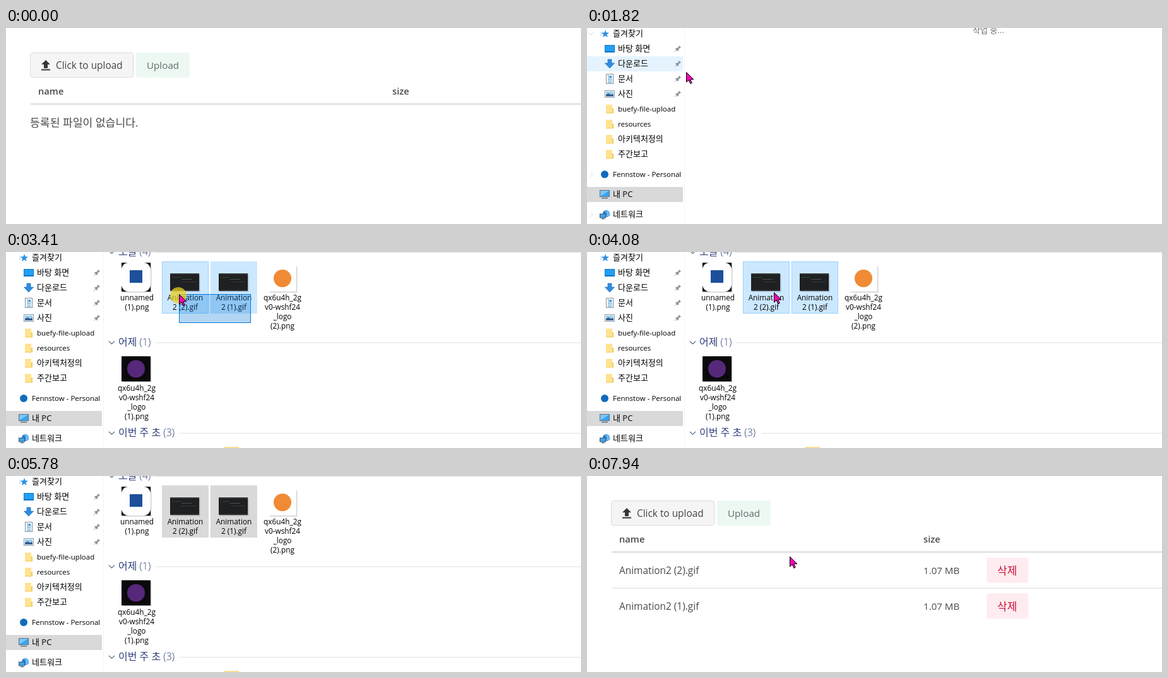
Animation, 911 px wide and 312 px high, one loop 8 s. Source, as an HTML page:

```html
<!DOCTYPE html>
<html lang="ko">
<head>
<meta charset="utf-8">
<title>File upload</title>
<style>
html, body { margin: 0; width: 100%; height: 100%; overflow: hidden; background: #fff; }
svg { display: block; width: 911px; height: 312px; }
text { font-family: "Open Sans", "Noto Sans CJK KR", "Noto Sans CJK", sans-serif; white-space: pre; }
</style>
</head>
<body>
<svg id="stage" viewBox="0 0 911 312" xmlns="http://www.w3.org/2000/svg"></svg>
<script>
const LOOP = 8000, FRAME = 69, HOVER_LAG = 130;
const stage = document.getElementById('stage');

// ---- markup helpers ----
const rect = (x, y, w, h, fill, more = '') =>
  `<rect x="${x}" y="${y}" width="${w}" height="${h}" fill="${fill}" ${more}/>`;
const circle = (x, y, r, fill, more = '') =>
  `<circle cx="${x}" cy="${y}" r="${r}" fill="${fill}" ${more}/>`;
const text = (x, y, size, fill, str, more = '') =>
  `<text x="${x}" y="${y}" font-size="${size}" fill="${fill}" ${more}>${str}</text>`;
const path = (d, fill, more = '') => `<path d="${d}" fill="${fill}" ${more}/>`;
const line = (d, color, w = 1) => path(d, 'none', `stroke="${color}" stroke-width="${w}"`);
const group = (id, body, more = '') => `<g id="${id}" ${more}>${body}</g>`;
const at = (x, y, body) => `<g transform="translate(${x} ${y})">${body}</g>`;

// ---- upload page ----
const INK = '#4a4a4a';
const bold = 'font-weight="600"';

const fileRow = (y, name) =>
  text(51, y + 26, 15.4, INK, name) +
  text(533, y + 26, 15.1, INK, '1.07 MB') +
  rect(633, y, 66, 40, '#feecf0', 'rx="4"') +
  text(650, y + 26.5, 17, '#cc0f35', '삭제');

const page =
  rect(0, 0, 911, 312, '#fff') +
  rect(38.5, 39.5, 163, 39, '#f5f5f5', 'rx="3.5" stroke="#dbdbdb"') +
  at(51, 48, path('M9 16v-6H5l7-7 7 7h-4v6zM5 19.5v-2h14v2z', '#363636')) +
  text(79, 65, 15.4, '#444', 'Click to upload') +
  rect(206, 39, 85, 40, '#edf8f3', 'rx="4"') +
  text(223, 65, 15.2, '#5f6a66', 'Upload') +
  text(51, 106, 14.7, INK, 'name', bold) +
  text(612, 106, 14.7, INK, 'size', bold + ' id="size"') +
  rect(39, 120, 872, 2, '#dbdbdb') +
  group('empty', text(38, 157, 17.2, INK, '등록된 파일이 없습니다.')) +
  group('list', fileRow(130, 'Animation2 (2).gif') + rect(39, 178, 872, 1, '#dbdbdb') +
    fileRow(187, 'Animation2 (1).gif'));

// ---- navigation pane; icons are drawn around their centre ----
const icons = {
  star: path('M1-6 2.5-1.8 7-1.5 3.5 1.2 4.8 5.8 1 3.2-3 5.8-1.8 1.2-5-1.5-.5-1.8z', '#2f8fe0') +
    line('M-7-1H-4M-7 2H-4', '#8cc4f2'),
  desk: rect(-8, -6, 16, 12, '#1274c4') + rect(-7, -5, 14, 9, '#23a0f5'),
  down: path('M-3-7H3V-1H7.5L0 7-7.5-1H-3z', '#2f8de0', 'stroke="#1e6fb8" stroke-width=".7"'),
  doc: rect(-5.5, -7.5, 11, 15, '#fff', 'stroke="#7d8c99"') +
    line('M-3-4.5H0M-3-2H3.5M-3 .5H3.5M-3 3H3.5M-3 5.5H3.5', '#3a8fd0') + rect(0, -5, 3, 3, '#3a8fd0'),
  photo: rect(-7.5, -5.5, 15, 11, '#fff', 'stroke="#8b98a5"') +
    rect(-6, -4, 12, 8, '#9fd0f2') + path('M-6 4V1L-2-1 2 1 6 0V4z', '#35618f'),
  folder: path('M-6-7H4V-1H6V7H-6z', '#ffe391') + path('M4-1H6V7H-6V6H4z', '#f2cb5c'),
  dot: circle(0, 0, 6, '#0f6cbd'),
  pc: rect(-7.5, -6.5, 15, 10, '#3aa5ee', 'stroke="#5a7184"') +
    path('M-7-6H7L-7 3z', '#7cc7f8') + rect(-5, 5, 10, 1.5, '#5a7184'),
  net: circle(2.5, -1.5, 5.5, '#2b7fd0') +
    path('M0-6Q4-4 3 0T6 3 8-2 4-7z', '#6db9f0') +
    rect(-7.5, -1, 9, 6, '#3aa5ee', 'stroke="#445566"') + rect(-5, 6, 5, 1.2, '#445566')
};
const pin = path('M2-5 5-2 4-1.2 3.3-1.5 1 1 1 3.2 0 4-1.8 2.2-5 5-5.3 4.7-2.4 1.4-4-.3-3-1.2-1-1 1.4-3.3 1-4z', '#8d9399');

const nav = [
  ['star', '즐겨찾기'], ['desk', '바탕 화면'], ['down', '다운로드'], ['doc', '문서'], ['photo', '사진'],
  ['folder', 'buefy-file-upload'], ['folder', 'resources'], ['folder', '아키텍처정의'], ['folder', '주간보고'],
  ['dot', 'Fennstow - Personal'], ['pc', '내 PC'], ['net', '네트워크']
];
const isRoot = i => i === 0 || i > 8;
const rowY = i => i < 9 ? 9 + 24 * i : 233 + 32 * (i - 9);

function navRow([icon, name], i) {
  const y = rowY(i), root = isRoot(i);
  const size = /[가-힣]/.test(name) ? 13 : 11.5;
  return at(root ? 28 : 36, y, icons[icon]) +
    text(root ? 41 : 49, y + 4.3, size, '#000', name) +
    (i > 0 && i < 5 ? at(144, y, pin) : '');
}
const arrows = nav.map((_, i) => !isRoot(i) ? '' :
  at(6, rowY(i), line(i ? 'M-1-4 3 0-1 4' : 'M-4-2 0 2 4-2', '#d8d8d8'))).join('');

// ---- file pane ----
const header = (y, name, from) =>
  line(`M163 ${y - 2} 167.5 ${y + 2.5} 172 ${y - 2}`, '#5c6b8c', 1.2) +
  text(178, y + 5, 16, '#31427e', name, 'font-weight="300"') + rect(from, y, 911 - from, 1, '#e2e2e2');

const label = (x, y, lines) => lines.map((s, i) =>
  text(x, y + 15 * i, 11.8, '#000', s, 'text-anchor="middle"')).join('');

const thumb = (x, y, w, h, fill, body) =>
  rect(x + 1.5, y + 1.5, w, h, '#000', 'opacity=".18"') + rect(x, y, w, h, fill) + body;

const clip = (x, n) => thumb(x, 34, 46, 28, '#1f2022',
  rect(x, 34, 46, 2, '#35373a') + rect(x + 3, 40, 14, 1, '#38403c') +
  rect(x + 18, 43, 16, 1, '#46504b') + rect(x + 18, 47, 24, 1, '#33373a') + rect(x, 60, 46, 2, '#2b2d30')) +
  label(x + 24, 77, ['Animation', `2 (${n}).gif`]);

const brand = n => ['qx6u4h_2g', 'v0-wshf24', '_logo', `(${n}).png`];
const pick = (id, x) => rect(x + 0.5, 15.5, 73, 82, '#cce8ff', `id="${id}"`);

const files =
  rect(156, 131, 755, 25, '#e5f3ff', 'id="headHover"') +
  rect(170, 164, 74, 108, '#e5f3ff', 'id="itemHover"') +
  pick('pickA', 247) + pick('pickB', 324) +
  header(0, '오늘 (4)', 234) + header(144, '어제 (1)', 237) + header(288, '이번 주 초 (3)', 276) +
  thumb(183, 17, 46, 46, '#000', rect(183, 17, 46, 46, '#fff', 'rx="11"') + rect(196, 29, 20, 20, '#1d4f9c')) +
  label(207.5, 77, ['unnamed', '(1).png']) +
  clip(260, 2) + clip(337, 1) +
  thumb(416, 22, 44, 41, '#fff', circle(438, 42, 14, '#f08a35')) +
  label(438, 77, brand(2)) +
  thumb(183, 166, 46, 40, '#0c090c', circle(206, 186, 14, '#56287a')) +
  label(207, 221, brand(1)) +
  path('M345 312V310.5H369V312z', '#f7d774');

const win =
  rect(0, 0, 911, 312, '#fff') + rect(154, 0, 1, 312, '#f4f4f4') +
  rect(0, 45, 152, 24, '#e5f3ff', 'id="navHover"') + rect(0, 253, 152, 24, '#d9d9d9') +
  group('arrows', arrows) + nav.map(navRow).join('') +
  group('busy', text(611, 8, 13, '#6d6d6d', '작업 중...')) +
  group('files', files);

stage.innerHTML = group('page', page) + group('win', win) +
  rect(0, 0, 0, 0, '#0078d7', 'id="band" fill-opacity=".3" stroke="#0078d7"') +
  group('pointer', circle(-1, 2, 13, '#e8cf22', 'id="ring" opacity=".75"') +
    path('M.5.5V16.2L4.2 12.8 6.8 18.6 9.2 17.5 6.7 11.9H11.9z', '#f707b6', 'stroke="#000"'));

// ---- pointer motion: smooth curves through points spaced evenly in time ----
const move = (from, to, ...points) => ({ from, to, points });
const moves = [
  move(120, 880, [645, 204], [400, 105], [200, 68], [132, 57]),
  move(1540, 1820, [132, 57], [157, 70]),
  move(1820, 2800, [157, 70], [210, 150], [298, 209], [388, 148], [387, 113]),
  move(3000, 3408, [387, 113], [274, 67]),
  move(3408, 3680, [274, 67], [266, 47]),
  move(3810, 4580, [266, 47], [330, 88], [408, 172]),
  move(4580, 4780, [408, 172], [430, 233]),
  move(6380, 6656, [405, 302], [454, 275]),
  move(6656, 7140, [454, 275], [552, 196], [526, 218]),
  move(7140, 7540, [526, 218], [487, 173]),
  move(7670, 7940, [487, 173], [321, 128])
];

const clamp = v => Math.max(0, Math.min(1, v));
const spline = (a, b, c, d, u) =>
  b + u * (c - a + u * (2 * a - 5 * b + 4 * c - d + u * (3 * (b - c) + d - a))) / 2;

function pointerAt(t) {
  const m = moves.filter(m => m.from <= t).pop() || moves[0];
  const steps = Math.round((m.to - m.from) / FRAME);
  const p = Math.floor(clamp((t - m.from) / (m.to - m.from)) * steps + 0.01) / steps;
  const last = m.points.length - 1;
  const i = Math.min(last - 1, Math.floor(p * last));
  const point = k => m.points[Math.max(0, Math.min(last, k))];
  return [0, 1].map(n => spline(point(i - 1)[n], point(i)[n], point(i + 1)[n], point(i + 2)[n], p * last - i));
}

const el = {};
stage.querySelectorAll('[id]').forEach(n => el[n.id] = n);
const show = (id, on) => el[id].setAttribute('visibility', on ? 'inherit' : 'hidden');
const set = (id, attrs) => { for (const k in attrs) el[id].setAttribute(k, attrs[k]); };

function draw(t) {
  const [x, y] = pointerAt(t), [hx, hy] = pointerAt(t - HOVER_LAG);
  const done = t >= 6050;
  const drag = t >= 3000 && t < 3680;
  const loaded = t >= 1885;
  const inside = t < 4850;

  show('empty', !done);
  show('list', done);
  set('size', { x: done ? 533 : 612 });

  const alpha = !done ? clamp((t - 1340) / 220) : t < 6180 ? 0.4 : 0;
  set('win', { opacity: alpha });
  show('win', alpha > 0);
  show('busy', !loaded);
  show('files', loaded);

  show('arrows', hx < 153);
  show('navHover', hx < 153 && hy >= 45 && hy < 70);
  show('headHover', inside && hx > 156 && hy >= 131 && hy < 156);
  show('itemHover', inside && hx > 170 && hx < 244 && hy >= 164 && hy < 272);

  const focused = t < 5780;
  const fill = focused ? '#cce8ff' : '#d9d9d9';
  for (const [id, left] of [['pickA', 247], ['pickB', 324]]) {
    show(id, loaded && t >= 3000 && (!drag || (y < 98 && x < left + 74)));
    const edged = focused && (!drag || (x > left && x < left + 74));
    set(id, { fill, stroke: edged ? '#99d1ff' : fill });
  }

  const left = Math.round(x), top = Math.round(y);
  show('band', drag);
  set('band', { x: left + 0.5, y: top + 0.5, width: Math.max(0, 387 - left), height: Math.max(0, 112 - top) });

  show('pointer', (t >= 120 && inside) || t >= 6380);
  show('ring', drag || (t >= 1210 && t < 1350));
  set('pointer', { transform: `translate(${left} ${top})` });
}

const start = performance.now();
function tick() {
  draw((performance.now() - start) % LOOP);
  requestAnimationFrame(tick);
}
tick();
</script>
</body>
</html>
```
